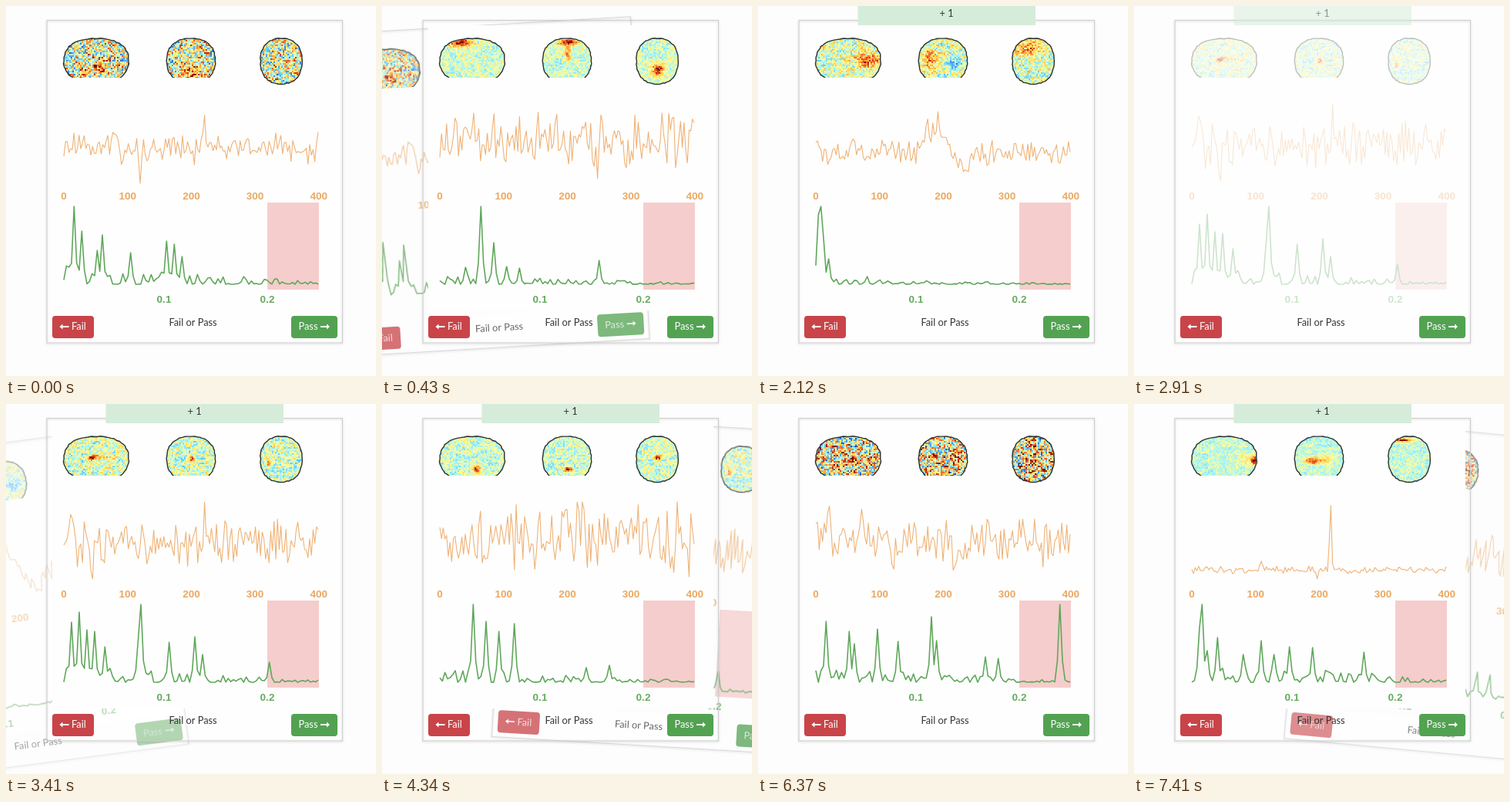
Animation, 480 px wide and 480 px high, one loop 7540 ms. Source, as an HTML page with a canvas:

```html
<!DOCTYPE html>
<html lang="en">
<head>
<meta charset="utf-8">
<style>
html, body { margin: 0; width: 100%; height: 100%; overflow: hidden; background: #fdfdfd; }
canvas { display: block; width: 480px; height: 480px; }
</style>
</head>
<body>
<canvas id="stage"></canvas>
<script>
const LOOP = 7540, STEP = 130, SIZE = 480;
const FONT = '12.8px Lato, "Open Sans", sans-serif';
const scale = Math.max(1, window.devicePixelRatio || 1);
const ctx = setup(document.getElementById('stage'));

// Swipes: start time and direction. Each brings in the next card.
const swipes = [[150, -1], [1335, 1], [2885, -1], [4075, 1], [5295, -1], [7015, 1]];

// Brain views (sagittal, coronal, axial): centre, radii, bottom cut
const views = [[117, 71, 42, 29, 93], [240, 71, 31.5, 29, 93], [357, 71.5, 27, 29.5, 110]];
const heat = ['#19409c', '#3c8ae8', '#64c6f8', '#a4f4f6', '#fdfda0', '#ffda55', '#fc8c3c', '#d83a18', '#730a00']
  .map(hex => [1, 3, 5].map(i => parseInt(hex.slice(i, i + 2), 16)));

// map: level and noise of the brain maps; spots: x, y, rx, ry, strength
// wave: level and noise; bumps: x, offset, width
// rough: floor of the power curve; peaks: index, height
const cards = [
  { map: [.5, .6], spots: [[117, 80, 22, 9, .2], [240, 84, 20, 8, .25]],
    wave: [184, 24], bumps: [[174, 44, 2], [257, -56, 2.5]],
    rough: 26, peaks: [[4, 103], [7, 71], [13, 46], [15, 66], [26, 43], [40, 58], [43, 54], [46, 38]] },
  { map: [.44, .18], spots: [[100, 47, 16, 5, .5], [241, 46, 13, 4, .5], [240, 60, 4, 10, .35], [357, 82, 8, 8, .5]],
    wave: [174, 46], bumps: [[239, 36, 3], [279, 40, 3]],
    rough: 13, peaks: [[10, 24], [16, 103], [21, 56], [26, 25], [31, 23], [62, 33]] },
  { map: [.46, .3], spots: [[142, 69, 16, 9, .4], [222, 68, 10, 12, .35], [348, 54, 16, 10, .3], [252, 74, 9, 8, -.2]],
    wave: [190, 20], bumps: [[222, -30, 9], [236, -38, 6], [268, 26, 9]],
    rough: 8, peaks: [[0, 22], [1, 92], [2, 103], [3, 62], [5, 35], [20, 12]] },
  { map: [.45, .28], spots: [[112, 68, 5, 3, .5], [125, 68, 28, 3, .15], [240, 69, 4, 5, .4], [340, 76, 4, 3, .4]],
    wave: [180, 36], bumps: [[84, -40, 2], [111, 40, 2], [257, -35, 2]],
    rough: 22, peaks: [[3, 80], [6, 93], [9, 70], [12, 68], [16, 48], [29, 60], [30, 103], [41, 54], [51, 61], [54, 38], [80, 28]] },
  { map: [.44, .2], spots: [[122, 84, 5, 4, .55], [240, 84, 6, 3, .55], [357, 69, 5, 3, .55]],
    wave: [175, 55], bumps: [],
    rough: 18, peaks: [[13, 103], [18, 81], [23, 68], [29, 78], [57, 21], [66, 24]] },
  { map: [.5, .7], spots: [[122, 72, 36, 14, .1], [240, 72, 28, 12, .14], [357, 72, 18, 22, .1]],
    wave: [178, 34], bumps: [[92, -45, 2], [133, -40, 2], [176, 40, 2], [256, 40, 3]],
    rough: 20, peaks: [[4, 81], [13, 68], [15, 52], [24, 71], [32, 55], [45, 87], [47, 56], [66, 35], [71, 33], [95, 103]] },
  { map: [.42, .13], spots: [[155, 72, 4, 5, .6], [144, 72, 10, 8, .13], [230, 73, 9, 4, .5], [246, 71, 9, 5, .25], [348, 46, 11, 2.5, .5]],
    wave: [215, 6], bumps: [[165, -11, 2], [238, 12, 2], [255, -88, 1.8]],
    rough: 30, peaks: [[3, 73], [4, 103], [6, 43], [10, 60], [20, 38], [27, 56], [32, 38], [38, 48], [47, 47], [67, 41]] }
];

function setup(canvas) {
  canvas.width = canvas.height = SIZE * scale;
  const c = canvas.getContext('2d');
  c.scale(scale, scale);
  return c;
}

function rand(a, b, seed) {
  const v = Math.sin(a * 12.9898 + b * 78.233 + seed * 37.719) * 43758.5453;
  return v - Math.floor(v);
}

function heatColor(v) {
  const p = Math.min(.999, Math.max(0, v)) * (heat.length - 1), i = Math.floor(p);
  return `rgb(${heat[i].map((a, n) => Math.round(a + (heat[i + 1][n] - a) * (p - i)))})`;
}

function drawBrain(c, [cx, cy, rx, ry, cut], card, seed) {
  const path = new Path2D(), power = (v, r) => Math.sign(v) * Math.abs(v) ** .86 * r;
  for (let i = 0; i < 60; i++) {
    const a = i / 30 * Math.PI, wobble = 1 + .018 * (rand(i, 3, rx) - .5) * 2;
    path.lineTo(cx + power(Math.cos(a), rx) * wobble, cy + power(Math.sin(a), ry) * wobble);
  }
  path.closePath();
  c.save();
  c.beginPath();
  c.rect(0, 0, SIZE, cut);
  c.clip();
  c.save();
  c.clip(path);
  const [level, noise] = card.map;
  for (let x = Math.floor(cx - rx) - 1; x < cx + rx + 2; x += 2) {
    for (let y = 40; y < 104; y += 2) {
      const n = rand(x, y, seed) + .6 * rand(x >> 3, y >> 2, seed + 9) - .8;
      let v = level + noise * n;
      for (const [sx, sy, w, h, s] of card.spots)
        v += s * Math.exp(-(((x - sx) / w) ** 2 + ((y - sy) / h) ** 2)) * (.7 + .6 * rand(y, x, seed));
      c.fillStyle = heatColor(v);
      c.fillRect(x, y, 2, 2);
    }
  }
  c.restore();
  c.strokeStyle = '#2b3030';
  c.lineWidth = 1.4;
  c.stroke(path);
  c.restore();
}

// Curve of evenly spaced points across the plot
function plot(c, count, color, width, value) {
  c.beginPath();
  for (let i = 0; i <= count; i++) {
    const x = 75 + 330 * i / count;
    c.lineTo(x, value(i, x));
  }
  c.strokeStyle = color;
  c.lineWidth = width;
  c.stroke();
}

function text(c, str, x, y, font, color, align = 'center') {
  c.font = font;
  c.fillStyle = color;
  c.textAlign = align;
  c.textBaseline = 'middle';
  c.fillText(str, x, y);
}

function axis(c, labels, x, gap, y, color) {
  labels.forEach((str, i) =>
    text(c, str, x + i * gap, y, 'bold 13.5px "Liberation Sans", Arial, sans-serif', color));
}

function makePicture(card, index) {
  const canvas = document.createElement('canvas'), c = setup(canvas), seed = index + 1;
  c.lineJoin = 'round';
  views.forEach((view, i) => drawBrain(c, view, card, seed + i * .37));

  const [level, noise] = card.wave;
  plot(c, 150, '#efb276', 1.1, (i, x) => {
    let y = level + noise * (rand(i, 1, seed) + rand(i, 2, seed) - 1);
    for (const [bx, dy, w] of card.bumps) y += dy * Math.exp(-(((x - bx) / w) ** 2));
    return Math.min(230, Math.max(127, y));
  });
  axis(c, ['0', '100', '200', '300', '400'], 75, 82.7, 247.5, '#eba862');

  c.fillStyle = '#f5cdcc';
  c.fillRect(339, 255, 67, 113);
  plot(c, 99, '#5fa75a', 1.6, i => {
    let h = 2 + card.rough * rand(i, 5, seed) ** 2 * (1 - i / 115);
    for (const [at, top] of card.peaks) h = Math.max(h, top * (1 - Math.abs(i - at) / 1.4));
    return 363 - h;
  });
  axis(c, ['0.1', '0.2'], 205, 134, 381, '#68ab62');
  return canvas;
}

const pictures = cards.map(makePicture);

function button(x, w, color, label, labelX, arrowX, dir) {
  ctx.fillStyle = color;
  ctx.beginPath();
  ctx.roundRect(x, 402, w, 29, 4);
  ctx.fill();
  text(ctx, label, labelX, 416.5, FONT, '#fff', 'left');
  ctx.fillRect(arrowX - 5.5, 415, 11, 2);
  ctx.beginPath();
  ctx.moveTo(arrowX + 6.5 * dir, 416);
  ctx.lineTo(arrowX + 2.5 * dir, 412.5);
  ctx.lineTo(arrowX + 2.5 * dir, 419.5);
  ctx.fill();
}

function drawCard(i, fade) {
  ctx.save();
  ctx.shadowColor = 'rgba(0,0,0,.22)';
  ctx.shadowBlur = 3 * scale;
  ctx.shadowOffsetY = scale;
  ctx.strokeStyle = '#cfcfcf';
  ctx.strokeRect(53, 18.5, 383.5, 418.5);
  ctx.restore();
  ctx.fillStyle = '#fefefe';
  ctx.fillRect(60, 25, 370, 370);
  const alpha = ctx.globalAlpha;
  ctx.globalAlpha = alpha * fade;
  ctx.drawImage(pictures[i], 0, 0, SIZE, SIZE);
  ctx.globalAlpha = alpha;
  text(ctx, 'Fail or Pass', 242.5, 411.5, FONT, '#333');
  button(60, 54, '#c84449', 'Fail', 85, 76, -1);
  button(370, 60, '#52a251', 'Pass', 379.5, 413.5, 1);
}

function drawLeaving(i, k, dir) {
  const d = 45 * k + 2.8 * k * k;
  ctx.save();
  ctx.globalAlpha = Math.max(0, 1 - d / 400);
  ctx.translate(245 + dir * d, 228 + d * d / 1650);
  ctx.rotate(dir * d / 30 * Math.PI / 180);
  ctx.translate(-245, -228);
  drawCard(i, 1);
  ctx.restore();
}

function drawBanner(alpha) {
  ctx.globalAlpha = alpha;
  ctx.fillStyle = '#d6ecda';
  ctx.fillRect(129.5, 0, 230.5, 25);
  text(ctx, '+ 1', 244.5, 10, FONT, '#333');
  ctx.globalAlpha = 1;
}

function draw(t) {
  const current = swipes.filter(s => t >= s[0]).length;
  ctx.fillStyle = '#fdfdfd';
  ctx.fillRect(0, 0, SIZE, SIZE);
  ctx.fillStyle = '#fefefe';
  ctx.fillRect(53, 18.5, 383.5, 418.5);
  if (!current) return drawCard(0, 1);

  const [start, dir] = swipes[current - 1];
  const age = t - start, k = Math.floor(age / STEP);
  if (k > 0 && k < 6) drawLeaving(current - 1, k, dir);
  drawCard(current, Math.min(1, .3 + .35 * k));
  if (current > 1) {
    const alpha = k < 1 ? .5 : Math.min(1, (1060 - age) / 200);
    if (alpha > 0) drawBanner(alpha);
  }
}

const begin = performance.now();
function tick() {
  draw((performance.now() - begin) % LOOP);
  requestAnimationFrame(tick);
}
tick();
</script>
</body>
</html>
```
